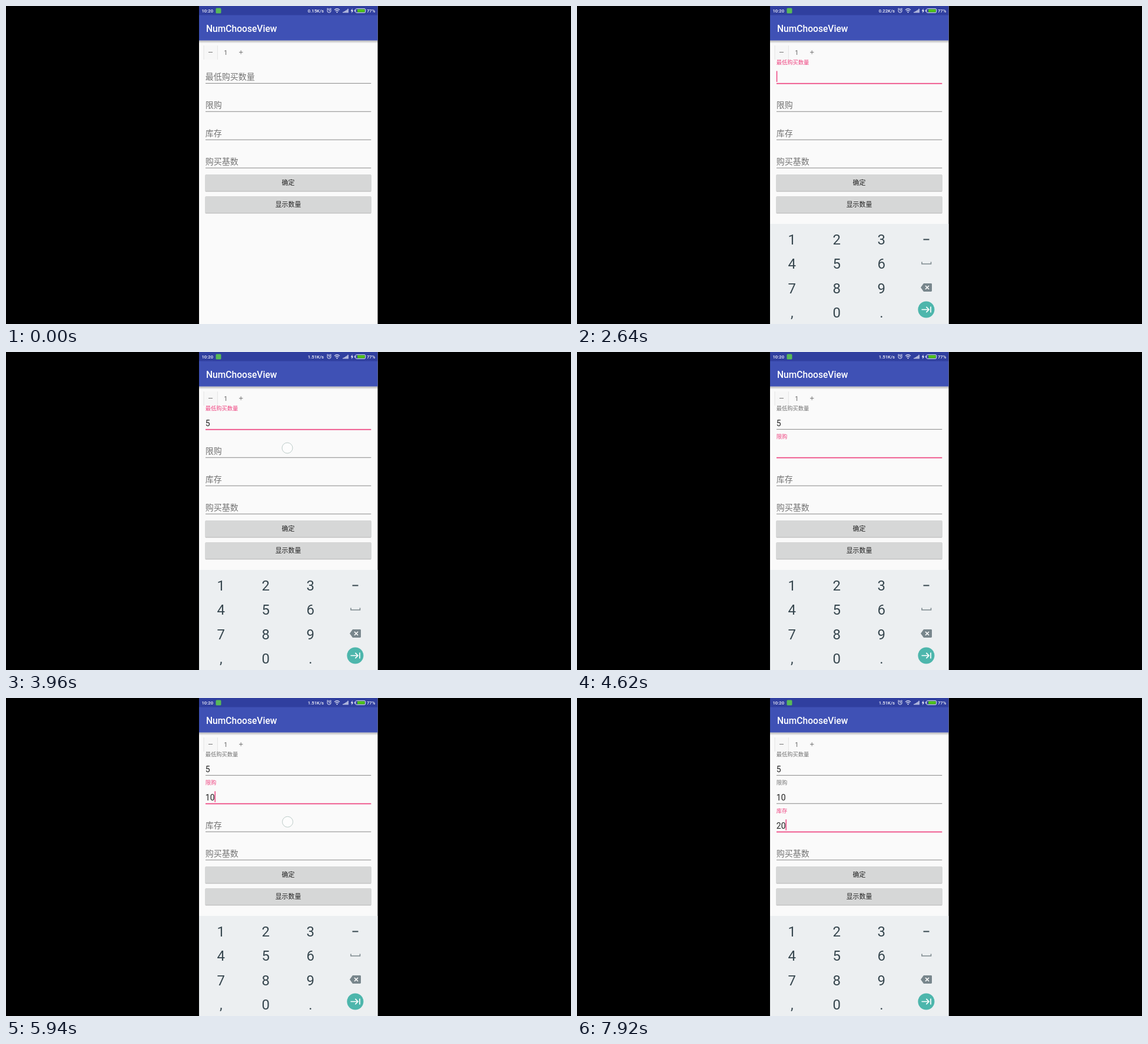
Animation of 960x540 px, one loop 8 s. Source, as an HTML page:

```html
<!DOCTYPE html>
<html lang="zh-CN">
<head>
<meta charset="utf-8">
<title>NumChooseView</title>
<style>
html, body { margin: 0; width: 100%; height: 100%; overflow: hidden; background: #000; }
svg { display: block; width: 100vw; height: 100vh; }
text { font-family: Roboto, "Noto Sans CJK SC", "Noto Sans CJK", sans-serif; }
.status { font-size: 7.7px; font-weight: 500; fill: #f4f5fb; }
.title { font-size: 15.6px; font-weight: 500; fill: #fff; }
.hint { fill: #747474; }
.value { font-size: 14px; fill: #222; }
.button { font-size: 10.9px; font-weight: 500; fill: #212121; text-anchor: middle; }
.key { font-size: 24px; fill: #37474f; text-anchor: middle; }
</style>
</head>
<body>
<svg viewBox="0 0 960 540" xmlns="http://www.w3.org/2000/svg">
  <defs>
    <linearGradient id="shade" x2="0" y2="1">
      <stop stop-color="#000" stop-opacity=".28"/>
      <stop offset="1" stop-color="#000" stop-opacity="0"/>
    </linearGradient>
    <clipPath id="screen"><rect x="328" width="303.5" height="540"/></clipPath>
  </defs>
  <rect width="960" height="540"/>
  <g clip-path="url(#screen)">
    <rect x="328" width="304" height="540" fill="#fafafa"/>
    <rect x="328" y="58.5" width="304" height="5" fill="url(#shade)"/>
    <rect x="328" y="15" width="304" height="43.5" fill="#3f51b5"/>
    <rect x="328" width="304" height="15.5" fill="#303f9f"/>
    <text class="title" x="340" y="43.5">NumChooseView</text>

    <text class="status" x="332.5" y="10.8">10:20</text>
    <rect x="356.5" y="3.5" width="9" height="9" rx="1.5" fill="#58b957"/>
    <text class="status" id="speed" x="512.8" y="10.8"></text>
    <g fill="none" stroke="#e4e7f6" stroke-width="1">
      <circle cx="549" cy="8" r="3.2"/>
      <path d="M549 6v2.2h1.7M545 5.4l2-1.7M553 5.4l-2-1.7"/>
      <path d="M558 6.6q4.5-3.8 9 0M559.7 8.6q2.8-2.4 5.6 0" stroke-width="1.2"/>
      <path d="M561 10.2q1.5-1.2 3 0l-1.5 1.6z" fill="#e4e7f6" stroke="none"/>
      <path d="M573 11.5v-1.6M575 11.5v-2.6M577 11.5v-3.8M579 11.5v-5M581 11.5v-6.7" stroke-width="1.4"/>
      <rect x="594" y="4.6" width="16.6" height="6.8" rx="1.6"/>
      <path d="M592.7 6.6v2.8" stroke-width="1.3"/>
    </g>
    <path d="M588.8 4l-3 4.6h2l-.8 3.6 3.2-4.8h-2.1z" fill="#fff"/>
    <rect x="597" y="5.6" width="12.6" height="4.8" rx=".6" fill="#4fc418"/>
    <text class="status" x="613" y="10.8">77%</text>

    <rect x="336" y="67" width="24" height="24" fill="#f7f7f7"/>
    <path d="M336 67v24M359.5 67v24" stroke="#e6e6e6"/>
    <path d="M344 78.5h7M396 78.5h6.4M399.2 75.3v6.4" stroke="#777"/>
    <text x="373.2" y="82.6" font-size="10.9" fill="#666" text-anchor="middle">1</text>

    <g id="form"></g>
    <g id="buttons"></g>
    <g id="pad">
      <rect x="328" y="370" width="304" height="170" fill="#eceff1"/>
      <g id="keys"></g>
      <path d="M588.5 396.5h10" stroke="#37474f" stroke-width="2"/>
      <path d="M586 434.5v3.5h15.5v-3.5" fill="none" stroke="#7d898e" stroke-width="1.6"/>
      <path d="M584 478l5-7h12.6q1.4 0 1.4 1.4v11.2q0 1.4-1.4 1.4h-12.6z" fill="#78868c"/>
      <path d="M592 475l6 6m0-6l-6 6" stroke="#fff" stroke-width="1.6"/>
      <circle cx="593.4" cy="515.5" r="14" fill="#4db6ac"/>
      <path d="M585.5 515.5h12.5m-4.6-4.6l4.6 4.6l-4.6 4.6M601 510.5v10" fill="none" stroke="#fff" stroke-width="1.7"/>
    </g>
    <circle id="touch" r="9" fill="#fff" fill-opacity=".65" stroke="#bccbc8"/>
  </g>
</svg>
<script>
const LOOP = 8000, STEP = 330;
const PINK = '#ee427f';
const $ = id => document.getElementById(id);

function add(parent, tag, attrs, text = '') {
  const el = document.createElementNS('http://www.w3.org/2000/svg', tag);
  for (const k in attrs) el.setAttribute(k, attrs[k]);
  el.textContent = text;
  return parent.appendChild(el);
}
const set = (el, attrs) => { for (const k in attrs) el.setAttribute(k, attrs[k]); };

const fields = [
  { hint: '最低购买数量', focus: 8, typed: [[11, '5']] },
  { hint: '限购', focus: 13, typed: [[16, '1'], [17, '10']] },
  { hint: '库存', focus: 19, typed: [[21, '2'], [22, '20']] },
  { hint: '购买基数', focus: Infinity, typed: [] }
];
const touches = {
  10: [446, 440], 12: [478, 163], 15: [368, 399], 16: [456, 540],
  18: [478.5, 210.3], 20: [446, 399], 21: [456, 540]
};
const cursorOff = [9, 12, 14, 20, 23];

fields.forEach((f, i) => {
  f.y = 131 + i * 47.9;
  f.label = add($('form'), 'text', { class: 'hint', x: 338.8 }, f.hint);
  f.value = add($('form'), 'text', { class: 'value', x: 338.8, y: f.y - 5.2 });
  f.line = add($('form'), 'rect', { x: 339, width: 281.3 });
});
const cursor = add($('form'), 'rect', { width: 1.5, height: 18.5, fill: PINK });

['确定', '显示数量'].forEach((name, i) => {
  const y = 286 + i * 37, box = { x: 338.5, width: 282, rx: 1.5 };
  add($('buttons'), 'rect', { ...box, y: y + .6, height: 29.4, fill: '#000', opacity: .1 });
  add($('buttons'), 'rect', { ...box, y: y + .4, height: 28.7, fill: '#000', opacity: .17 });
  add($('buttons'), 'rect', { ...box, y, height: 28.3, fill: '#d6d7d7' });
  add($('buttons'), 'text', { class: 'button', x: 479.5, y: y + 18.2 }, name);
});

[...'123456789,0.'].forEach((c, i) =>
  add($('keys'), 'text', { class: 'key', x: 365.3 + i % 3 * 76, y: 405 + Math.floor(i / 3) * 41.3 }, c));

function render(t) {
  const n = Math.floor(t / STEP);
  $('speed').textContent = n < 2 ? '0.15K/s' : n < 11 ? '0.22K/s' : '1.51K/s';
  $('pad').style.display = n < 8 ? 'none' : '';

  let active = null;
  fields.forEach((f, i) => {
    const open = n >= f.focus;
    const on = open && !(fields[i + 1] && n >= fields[i + 1].focus);
    const last = f.typed.filter(([s]) => n >= s).pop();
    f.text = last ? last[1] : '';
    f.value.textContent = f.text;
    set(f.label, { y: f.y - (open ? 32.2 : 6.2), 'font-size': open ? 9.25 : 14 });
    f.label.style.fill = on ? PINK : '';
    set(f.line, { y: f.y - .2, height: on ? 1.7 : 1.1, fill: on ? PINK : '#929292' });
    if (on) active = f;
  });

  cursor.style.display = active && !cursorOff.includes(n) ? '' : 'none';
  if (active) set(cursor, { x: 338.8 + active.text.length * 7.85, y: active.y - 20.6 });

  const p = touches[n];
  $('touch').style.display = p ? '' : 'none';
  if (p) set($('touch'), { cx: p[0], cy: p[1] });
}

function tick(now) {
  render(now % LOOP);
  requestAnimationFrame(tick);
}
render(0);
requestAnimationFrame(tick);
</script>
</body>
</html>
```
